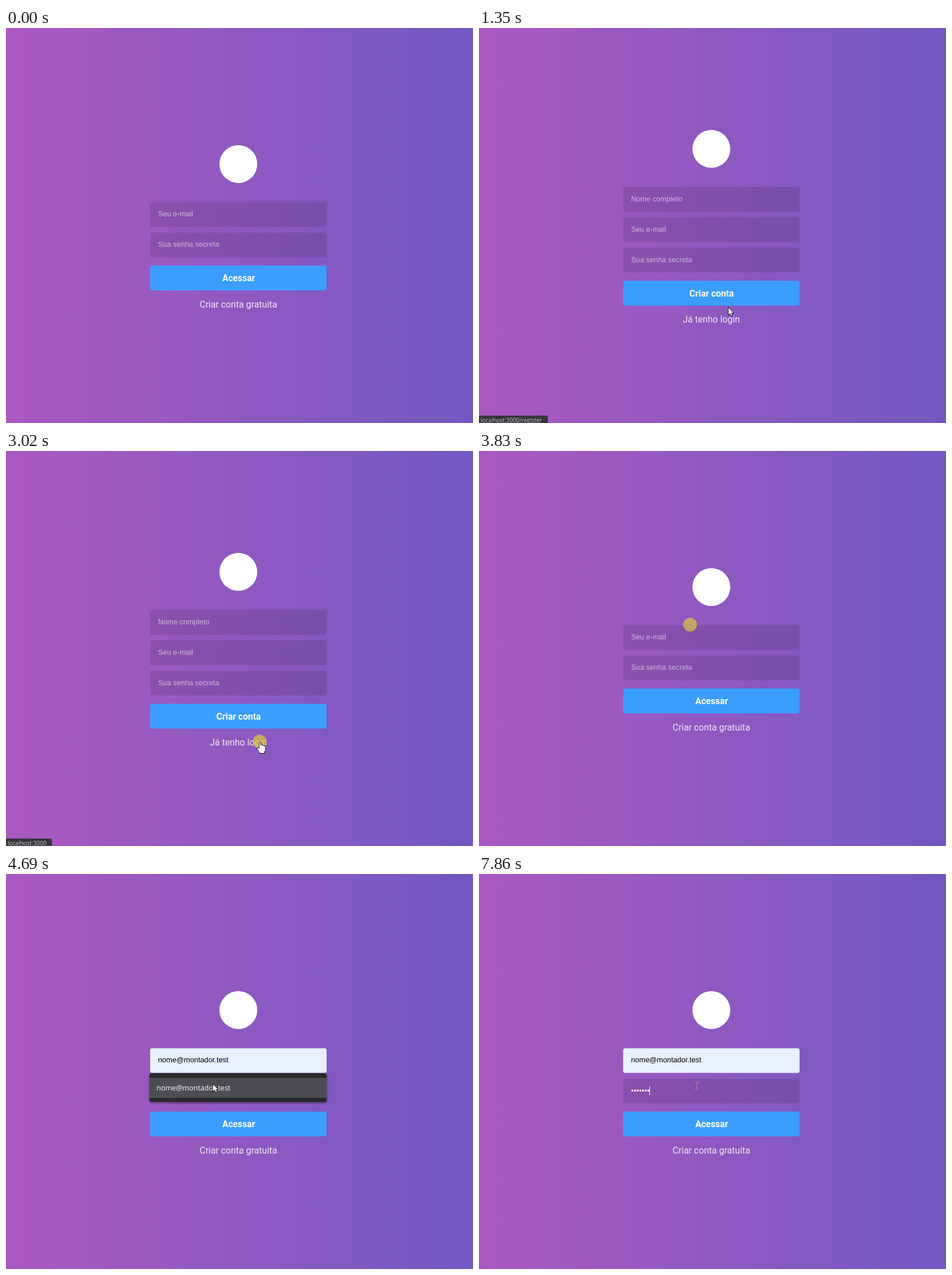
These frames come from a looping animation (814 by 688 pixels, 8 s). An HTML page:

```html
<!DOCTYPE html>
<html lang="pt-BR">
<head>
<meta charset="utf-8">
<title>Login</title>
<style>
  html, body { margin: 0; height: 100%; overflow: hidden; }
  svg { display: block; width: 100vw; height: 100vh; }
  text { white-space: pre; }
  .input { font: 12.8px "Liberation Sans", Arial, sans-serif; fill: #fff; }
  .hint { fill: rgba(255, 255, 255, .58); }
  .button { font: bold 15.6px Roboto, sans-serif; fill: #fff; text-anchor: middle; }
  .link { font: 15.8px Roboto, sans-serif; fill: rgba(255, 255, 255, .85); text-anchor: middle; }
  .option { font: 500 12.5px "Open Sans", sans-serif; fill: #fff; }
  .status { font: 10px "Open Sans", sans-serif; fill: #bdc1c6; }
  #popup { filter: drop-shadow(0 1px 2px rgba(0, 0, 0, .45)); }
</style>
</head>
<body>
<svg id="stage" viewBox="0 0 814 688">
  <defs>
    <linearGradient id="sky"><stop stop-color="#ab59c1"/><stop offset="1" stop-color="#7159c1"/></linearGradient>
  </defs>
  <rect width="814" height="688" fill="url(#sky)"/>
  <g id="login"></g>
  <g id="signup"></g>
  <g id="filled">
    <rect x="251.2" y="303.4" width="307.6" height="43.2" rx="4" fill="#e8f0fe"/>
    <text id="filledText" class="input" x="265" y="328.4" style="fill:#000"></text>
  </g>
  <text id="typed" class="input" x="265" y="328.4"></text>
  <text id="dots" class="input" x="265" y="381.6" style="font-size:13.3px"></text>
  <rect id="caret" width="1" height="15" fill="#fff"/>
  <g id="popup"></g>
  <g id="status">
    <rect id="statusBox" x="-4" y="675" height="20" rx="3" fill="#35363a"/>
    <text id="statusText" class="status" x="3" y="687"></text>
  </g>
  <circle id="halo" r="12" fill="rgba(215,195,65,.75)"/>
  <g id="arrow">
    <path d="M0 0V13.6L3 10.8 5.3 15.6 7.6 14.5 5.5 9.9H9.6Z" fill="#fff" stroke="#15121c"/>
  </g>
  <g id="hand">
    <path d="M-1.5 10V1.2Q0-.8 1.5 1.2V6Q3-.2 4.5 6.6 6 5 7.3 7.4 9.3 6.2 10 9V13Q9.5 16 8 17.5V20H-1V18L-5 12.5Q-5.4 9.8-3.4 10.2L-1.5 12Z"
      fill="#fff" stroke="#15121c"/>
  </g>
  <g id="beam">
    <path d="M-3.5-6.5H-1L0-5.5 1-6.5H3.5M-3.5 6.5H-1L0 5.5 1 6.5H3.5M0-5.5V5.5" fill="none" stroke="#b29aab" stroke-opacity=".8"/>
  </g>
</svg>
<script>
const LOOP = 8000;
const EMAIL = "nome@montador.test";
const OPTIONS = [EMAIL, "ajuda@modelo.test", "conta@ensaio.test", "lista@pedido.test", "prova@agenda.test", "teste@visita.test"];
const KEY_TIMES = [5690, 6060, 6860, 6990, 7230, 7480, 7860];

// [time, x, y] of the pointer's hot spot
const PATH = [
  [50, 676, 674], [790, 437, 494], [850, 436, 490], [970, 434, 486],
  [2150, 434, 486], [2520, 442, 506], [3030, 442, 506], [3760, 368, 302.5],
  [4260, 368, 302.5], [4690, 360, 365], [4940, 365, 368],
  [5070, 365, 368], [5370, 379, 368]
];
// [end time, shape]
const SHAPES = [
  [50, ""], [850, "arrow"], [1350, "hand"], [2400, "arrow"], [3030, "hand"],
  [3650, "arrow"], [4400, "beam"], [5000, "arrow"], [LOOP, "beam"]
];
const CLICKS = [[1220, 1290], [2960, 3030], [3830, 3890], [4940, 5000]];

const el = Object.fromEntries([...document.querySelectorAll("[id]")].map(node => [node.id, node]));
const show = (node, on) => { node.style.display = on ? "" : "none"; };
const place = (node, x, y) => node.setAttribute("transform", `translate(${x} ${y})`);
const between = (t, a, b) => t >= a && t < b;
const ramp = (t, a, b) => Math.min(1, Math.max(0, (t - a) / (b - a)));

const box = (y, fill) =>
  `<rect x="251.2" y="${y}" width="307.6" height="43.2" rx="4" fill="${fill}"/>`;

function form(top, hints, action, link) {
  const fields = hints.map((hint, i) => {
    const y = top + i * 52.8;
    return box(y, "rgba(0,0,0,.1)") + `<text class="input hint" x="265" y="${y + 25}">${hint}</text>`;
  });
  const y = top + hints.length * 52.8 + 4.8;
  return `<circle cx="405" cy="${top - 66.4}" r="33" fill="#fff"/>` + fields.join("") +
    box(y, "#3b9eff") +
    `<text class="button" x="405.5" y="${y + 27.5}">${action}</text>` +
    `<text class="link" x="405" y="${y + 73}">${link}</text>`;
}

el.login.innerHTML = form(303.4, ["Seu e-mail", "Sua senha secreta"], "Acessar", "Criar conta gratuita");
el.signup.innerHTML = form(277, ["Nome completo", "Seu e-mail", "Sua senha secreta"], "Criar conta", "Já tenho login");
el.filledText.textContent = EMAIL;
el.popup.innerHTML = `<rect x="250" y="347" width="309" rx="4" fill="#29292c"/>` +
  `<rect x="250" y="355" width="309" height="35" fill="#4c4d50"/>` +
  OPTIONS.map((name, i) => `<text class="option" x="262.5" y="${377 + i * 35}">${name}</text>`).join("");
const [panel, hover, ...options] = el.popup.children;
const [emailHint, passwordHint] = el.login.querySelectorAll(".hint");

function pointerAt(t) {
  const next = PATH.findIndex(point => point[0] > t);
  if (next < 0) return PATH.at(-1).slice(1);
  if (next === 0) return PATH[0].slice(1);
  const [t0, x0, y0] = PATH[next - 1], [t1, x1, y1] = PATH[next];
  const p = ramp(t, t0, t1), eased = p * (2 - p);
  return [x0 + (x1 - x0) * eased, y0 + (y1 - y0) * eased];
}

function drawFields(t) {
  const signup = between(t, 1290, 3030);
  const typing = between(t, 4200, 4500);
  const keys = KEY_TIMES.filter(time => time <= t).length;
  show(el.signup, signup);
  show(el.login, !signup);
  show(el.filled, t >= 4500);
  show(emailHint, t < 4200);
  show(passwordHint, !keys);
  el.typed.textContent = typing ? EMAIL[0] : "";
  el.dots.textContent = "•".repeat(keys);

  const inPassword = t >= 5370, afterEmail = between(t, 5000, 5070);
  show(el.caret, between(t, 3890, 4500) || afterEmail || inPassword && !between(t, 6550, 6860));
  el.caret.setAttribute("fill", afterEmail ? "#000" : "#fff");
  if (inPassword) place(el.caret, Math.round(264.7 + keys * 4.66), 370);
  else place(el.caret, afterEmail ? 390 : typing ? 272 : 265, 316);
}

function drawPopup(t) {
  const rows = between(t, 3890, 4200) ? OPTIONS.length : 1;
  show(el.popup, between(t, 3890, 5000));
  panel.setAttribute("height", 15 + rows * 35);
  show(hover, t >= 4500);
  options.forEach((option, i) => show(option, i < rows));
}

function drawStatus(t) {
  const first = t < 2000;
  el.statusText.textContent = first ? "localhost:3000/register" : "localhost:3000";
  el.statusBox.setAttribute("width", first ? 124 : 84);
  el.status.style.opacity = first
    ? ramp(t, 910, 1030) - ramp(t, 1640, 1840)
    : ramp(t, 2400, 2520) - ramp(t, 3340, 3540);
}

function drawPointer(t) {
  const [x, y] = pointerAt(t);
  const shape = SHAPES.find(([end]) => t < end)[1];
  for (const name of ["arrow", "hand", "beam"]) {
    show(el[name], name === shape);
    place(el[name], Math.round(x) + .5, Math.round(y) + .5);
  }
  show(el.halo, CLICKS.some(([from, to]) => between(t, from, to)));
  place(el.halo, x, y);
}

const start = performance.now();
function tick() {
  const t = (performance.now() - start) % LOOP;
  drawFields(t);
  drawPopup(t);
  drawStatus(t);
  drawPointer(t);
  requestAnimationFrame(tick);
}
tick();
</script>
</body>
</html>
```
